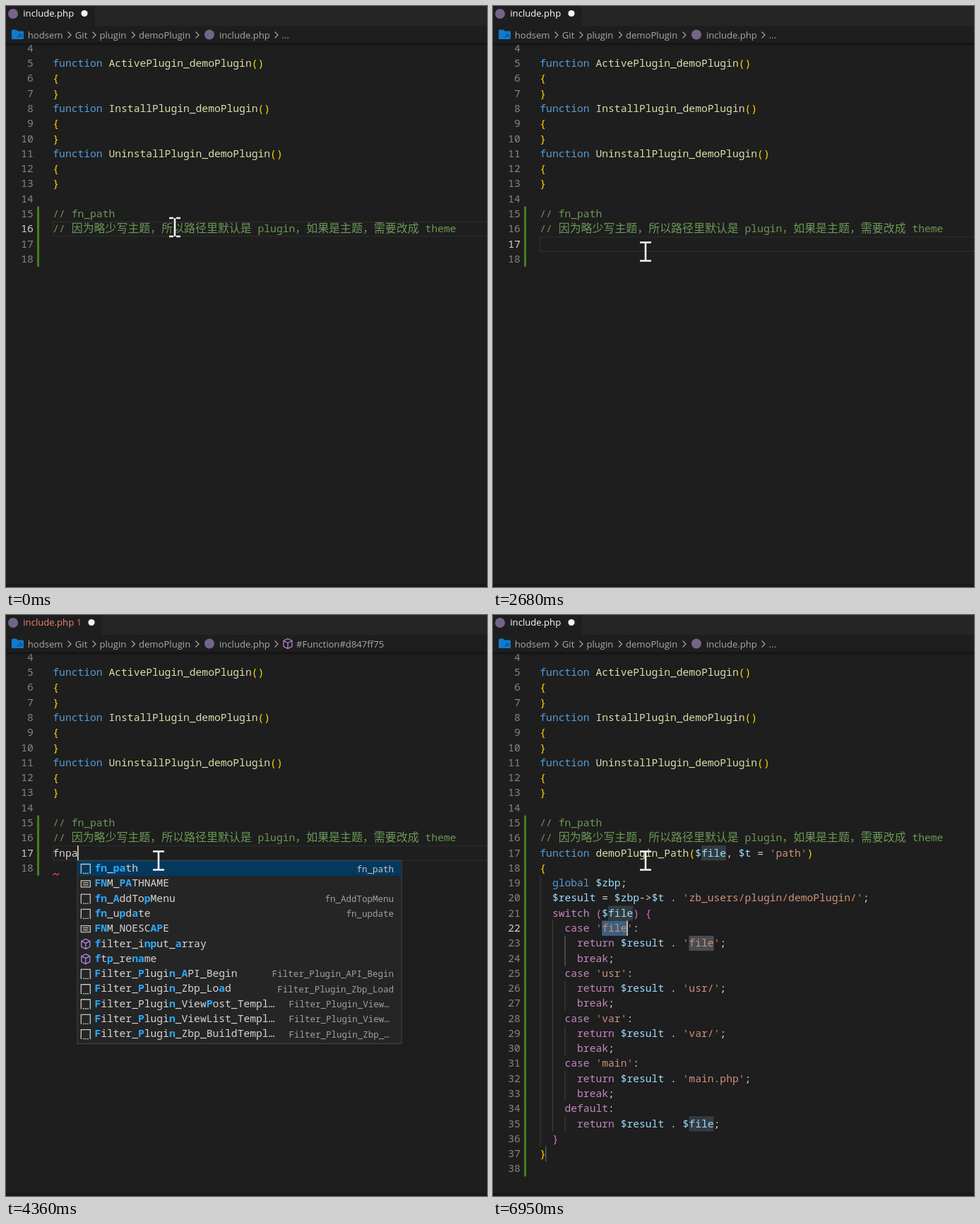
An HTML page that plays this animation: 681 px wide and 822 px high, repeating every 7.17 s.

```html
<!DOCTYPE html>
<html lang="zh-CN">
<head>
<meta charset="utf-8">
<title>Editor snippet demo</title>
<style>
html, body { margin: 0; width: 100%; height: 100%; overflow: hidden; background: #1e1e1e; }
svg { display: block; width: 681px; height: 822px; }
text { white-space: pre; fill: #d4d4d4; font: 14.66px "Noto Sans Mono", "DejaVu Sans Mono", monospace; }
.ui { font: 13.1px "Open Sans", "Noto Sans", sans-serif; fill: #a9a9a9; }
.cjk { font: 300 15.95px "Noto Sans CJK SC", "Noto Sans CJK", sans-serif; }
.num { fill: #858585; text-anchor: end; }
.on { fill: #d0d0d0; }
.detail { font-size: 12.47px; fill: #a0a0a0; }
.hit { fill: #2aaaff; font-weight: 700; }
.line { fill: none; stroke: #c5c5c5; stroke-width: 1.3; }
.cube { stroke: #b180d7; }
</style>
</head>
<body>
<svg id="stage" viewBox="0 0 681 822"></svg>
<script>
const LOOP = 7170, X0 = 66.3, CW = 8.797, LH = 21.28;
const INSERT = 4760;
const stage = document.getElementById('stage');
const parts = [];
const lineY = n => 70.8 + (n - 5) * LH;
const colX = n => X0 + n * CW;

function add(tag, attrs, parent = stage, text) {
  const e = document.createElementNS('http://www.w3.org/2000/svg', tag);
  for (const k in attrs) e.setAttribute(k, attrs[k]);
  if (text !== undefined) e.textContent = text;
  parent.appendChild(e);
  return e;
}
const rect = (x, y, width, height, fill, parent, rx = 0) =>
  add('rect', { x, y, width, height, fill, rx }, parent);
const ui = (x, y, s, fill, parent) =>
  add('text', { x, y, class: 'ui', style: fill ? 'fill:' + fill : '' }, parent, s);

// A group visible only inside the given [from, to) spans
function layer(...spans) {
  const g = add('g', {});
  parts.push([g, spans]);
  return g;
}

const ICONS = {
  cube: 'M0-7 6-4V4L0 7-6 4V-4ZM-6-4 0-1 6-4M0-1V7',
  square: 'M-6.5 7V-6.5H6.5V7M-4 6.5h2M-1 6.5h2M2 6.5h2',
  constant: 'M-6.5-4.5h13v9h-13ZM-4-1.5h8M-4 1.5h8',
  word: 'M-7-5.5h6M2-5.5h5M-7-2h3M-2-2h5M-7 1.5h8M3 1.5h4M-7 5h4M-1 5h7'
};
const icon = (kind, x, y, parent) => add('path', {
  d: ICONS[kind], class: 'line ' + kind, transform: `translate(${x} ${y})`
}, parent);

// ---- code text ----
const BLUE = ['function', 'global'];
const PINK = ['switch', 'case', 'return', 'break', 'default'];
let depth = 0;

function colour(tok) {
  if (tok.startsWith('//')) return '#6a9955';
  if (tok[0] === "'") return '#ce9178';
  if (tok[0] === '$') return '#9cdcfe';
  if (BLUE.includes(tok)) return '#569cd6';
  if (PINK.includes(tok)) return '#c586c0';
  if (/[({]/.test(tok)) return depth++ ? '#da70d6' : '#ffd700';
  if (/[)}]/.test(tok)) return --depth ? '#da70d6' : '#ffd700';
  return /\w/.test(tok) ? '#dcdcaa' : '#d4d4d4';
}

function codeLine(n, src, parent) {
  const t = add('text', { x: X0, y: lineY(n) + 15.4 }, parent);
  for (const tok of src.match(/\/\/.*|'[^']*'|\$\w+|[(){}]|\w+|\s+|./g) || []) {
    const style = 'fill:' + colour(tok);
    for (const run of tok.match(/[\x00-\x7f]+|[^\x00-\x7f]+/g))
      add('tspan', { style, class: run.charCodeAt(0) > 127 ? 'cjk' : '' }, t, run);
  }
}
const codeBlock = (first, src, parent) =>
  src.split('\n').forEach((s, i) => codeLine(first + i, s, parent));

const hooks = ['Active', 'Install', 'Uninstall']
  .map(s => `function ${s}Plugin_demoPlugin()\n{\n}`).join('\n');
const comments = '// fn_path\n// 因为略少写主题，所以路径里默认是 plugin，如果是主题，需要改成 theme';
const branch = (name, out) =>
  `    case '${name}':\n      return $result . '${out}';\n      break;\n`;
const snippet = "function demoPlugin_Path($file, $t = 'path')\n{\n  global $zbp;\n" +
  "  $result = $zbp->$t . 'zb_users/plugin/demoPlugin/';\n  switch ($file) {\n" +
  branch('file', 'file') + branch('usr', 'usr/') + branch('var', 'var/') + branch('main', 'main.php') +
  '    default:\n      return $result . $file;\n  }\n}';

// ---- backgrounds: current line, selections, guides ----
function currentLine(n, ...spans) {
  add('path', { d: `M690 ${lineY(n) + .6}H66.8v${LH - 1}H690`, fill: 'none', stroke: '#2f2f2f', 'stroke-width': 1.2 },
    layer(...spans));
}
currentLine(16, [0, 730]);
currentLine(17, [2150, INSERT]);

rect(220.5, lineY(16), 127.6, LH, '#264f78', layer([730, 860]), 3);
const picked = layer([860, 2150]);
rect(X0, lineY(16), 580, LH, '#264f78', picked, 3);
[88.6, 352.6, 589.2].forEach(cx =>
  add('circle', { cx, cy: lineY(16) + 11, r: 1, fill: '#8099ad' }, picked));

const inserted = layer([INSERT, LOOP]);
const vline = (x, a, b, fill) => rect(x, lineY(a), 1, (b - a + 1) * LH, fill, inserted);
vline(66.5, 19, 36, '#404040');
vline(84, 22, 35, '#404040');
[23, 26, 29, 32].forEach(n => vline(101.5, n, n + 1, n === 23 ? '#707070' : '#404040'));
vline(101.5, 35, 35, '#404040');
vline(74.3, 37, 37, '#7a7a7a');
const mark = (n, c, fill, g) => rect(colX(c), lineY(n), 4 * CW, LH, fill, g);
mark(22, 10, '#3d5f80', inserted);
const matches = layer([5020, LOOP]);
[[17, 26], [21, 11], [35, 24]].forEach(([n, c]) => mark(n, c, '#343b41', matches));
mark(23, 24, '#494c50', matches);

codeBlock(5, hooks);
codeBlock(15, comments);
codeBlock(17, snippet, layer([INSERT, LOOP]));

// ---- gutter ----
const ACTIVE = { 16: [0, 860], 17: [860, INSERT], 22: [INSERT, LOOP] };
for (let n = 4; n <= 38; n++) {
  const put = (cls, g) => add('text', { x: 38.9, y: lineY(n) + 15.4, class: cls }, g, n);
  const a = ACTIVE[n], from = n > 18 ? INSERT : 0;
  if (!a) put('num', layer([from, LOOP]));
  else {
    put('num on', layer(a));
    put('num', layer([from, a[0]], [a[1], LOOP]));
  }
}
rect(44, lineY(15), 3, 4 * LH, '#487e1a', layer([0, INSERT]));
rect(44, lineY(15), 3, 24 * LH, '#487e1a', inserted);

// ---- typed letters ----
[['f', 3400, 3610], ['fn', 3610, 4280], ['fnp', 4280, 4360], ['fnpa', 4360, INSERT]].forEach(([s, a, b]) =>
  add('text', { x: X0, y: lineY(17) + 15.4 }, layer([a, b]), s));

function squiggle(n, width, stroke, ...spans) {
  let d = `M${X0} ${lineY(n) + LH - .8}`;
  for (let x = 3, up = true; x <= width; x += 3, up = !up) d += `l3 ${up ? -2.4 : 2.4}`;
  add('path', { d, fill: 'none', stroke, 'stroke-width': 1.2 }, layer(...spans));
}
squiggle(18, 9, '#f14c4c', [4080, INSERT]);
squiggle(17, 35, '#f14c4c', [4560, INSERT]);
squiggle(17, 35, '#3794ff', [5020, 5160]);
squiggle(38, 9, '#f14c4c', [INSERT, 5160]);

const bulb = layer([5020, 5430]);
rect(70, 305.5, 12, 15, '#1e1e1e', bulb);
add('circle', { cx: 75.6, cy: 311.3, r: 5.4, fill: '#ffcc00' }, bulb);
rect(73, 315, 5.2, 5.4, '#ffcc00', bulb, 1);

// ---- carets ----
function caret(n, x, ...spans) {
  rect(x, lineY(n), 1.7, LH, '#d0d0ce', layer(...spans));
}
caret(16, 373.8, [200, 600]);
caret(16, 236.4, [600, 730]);
caret(17, X0, [1060, 1590], [2150, 2680], [3210, 3400]);
caret(17, colX(1), [3400, 3610]);
caret(17, colX(2), [3610, 4080]);
caret(17, colX(3), [4280, 4360]);
caret(17, colX(4) - .5, [4360, INSERT]);
caret(22, colX(14) - .3, [INSERT, 5500], [6030, 6490], [6950, LOOP]);

// ---- top bars ----
rect(0, 28, 681, 25, '#1e1e1e');
rect(0, 0, 681, 28, '#252526');
const DIRTY = [4220, 5700];
const clean = layer([0, DIRTY[0]], [DIRTY[1], LOOP]), dirty = layer(DIRTY);
[[clean, 126, 111, '#ffffff'], [dirty, 136, 121, '#f88070']].forEach(([g, w, dot, fill]) => {
  rect(0, 0, w, 28, '#1e1e1e', g);
  ui(24.3, 15.4, 'include.php', fill, g);
  add('circle', { cx: dot, cy: 10.5, r: 4.6, fill: '#f4f4f4' }, g);
});
ui(99.8, 15.2, '1', '#d0705f', dirty);
add('circle', { cx: 10, cy: 11, r: 7, fill: '#74648a' });
add('circle', { cx: 288, cy: 40.5, r: 7, fill: '#74648a' });

add('path', { d: 'M8 35q0-1.5 1.5-1.5h5l2 2h7q1.5 0 1.5 1.5v8.5q0 1.5-1.5 1.5h-14q-1.5 0-1.5-1.5z', fill: '#0f7bd0' });
add('path', { d: 'M15.5 44h1M18 44l2.5-5M21.5 44l1.5-3', fill: 'none', stroke: '#0b3f6c', 'stroke-width': 1.3 });
[[30.8, 'hodsem'], [97.8, 'Git'], [132.5, 'plugin'], [188, 'demoPlugin'], [302, 'include.php']].forEach(([x, s]) =>
  ui(x, 45.6, s));
[87.5, 122.5, 178, 268.5, 380.5].forEach(x =>
  add('path', { d: `M${x} 36.5l4.5 4.5-4.5 4.5`, class: 'line', style: 'stroke:#a0a0a0' }));
const SYMBOL = [3940, 5020];
ui(390.5, 45.6, '...', '', layer([0, SYMBOL[0]], [SYMBOL[1], LOOP]));
const symbol = layer(SYMBOL);
icon('cube', 399, 40.5, symbol);
ui(411, 45.6, '#Function#d847ff75', '', symbol);

[.42, .3, .2, .12, .05].forEach((a, i) => rect(0, 52.5 + i, 681, 1, `rgba(0,0,0,${a})`));
rect(0, 818, 681, 4, '#181819');

// ---- completion list; [ ] wraps matched letters ----
const shortList = [
  ['word', '[fn]'], ['cube', '[fn]match'],
  ...['a', 'AddTopMenu', 'Cmd_Ajax', 'GenTpl', 'path', 'update', 'ViewPost', 'zbp']
    .map(s => ['square', '[fn]_' + s, 'fn_' + s]),
  ['cube', '[fn]match'], ['constant', '[FN]M_PERIOD']
];
const longList = [
  ['square', '[fn]_[pa]th', 'fn_path'],
  ['constant', '[FN]M_[PA]THNAME'],
  ['square', '[fn]_[A]ddTo[p]Menu', 'fn_AddTopMenu'],
  ['square', '[fn]_u[p]d[a]te', 'fn_update'],
  ['constant', '[FN]M_NOESC[AP]E'],
  ['cube', '[f]ilter_i[np]ut_[a]rray'],
  ['cube', '[f]t[p]_re[na]me'],
  ['square', '[F]ilter_[P]lugi[n]_[A]PI_Begin', 'Filter_Plugin_API_Begin'],
  ['square', '[F]ilter_[P]lugi[n]_Zbp_Lo[a]d', 'Filter_Plugin_Zbp_Load'],
  ['square', '[F]ilter_Plugi[n]_View[P]ost_Templ…', 'Filter_Plugin_View…'],
  ['square', '[F]ilter_[P]lugi[n]_ViewList_Templ…', 'Filter_Plugin_View…'],
  ['square', '[F]ilter_[P]lugi[n]_Zbp_BuildTempl…', 'Filter_Plugin_Zbp_…']
];

function popup(typed, rows, from, to) {
  const g = layer([from, to]), x = colX(typed) - .4, y = 347.5;
  add('rect', { x, y, width: 459, height: 259, fill: '#252526', stroke: '#454545' }, g);
  rect(x + .5, y + .5, 458, 21, '#04395e', g);
  if (rows === shortList) rect(x + 447.5, y + .5, 11, 42, '#4d4f52', g);
  rows.forEach(([kind, label, detail], i) => {
    const cy = 358.5 + i * LH;
    icon(kind, x + 11.7, cy + .5, g);
    const t = add('text', { x: x + 24.3, y: cy + 4.6 }, g);
    const text = typed === 1 ? label.replace(/\[(.)(.)\]/, '[$1]$2') : label;
    text.split(/[\[\]]/).forEach((s, k) => s && add('tspan', { class: k % 2 ? 'hit' : '' }, t, s));
    if (!detail) return;
    const cut = detail.endsWith('…');
    add('text', {
      x: x + (cut ? 299.5 : 447.8), y: cy + 5, class: 'detail',
      'text-anchor': cut ? 'start' : 'end', style: i ? '' : 'fill:#c5c5c5'
    }, g, detail);
  });
}
popup(1, shortList, 3470, 3610);
popup(2, shortList, 3610, 4280);
popup(3, longList, 4280, 4360);
popup(4, longList, 4360, INSERT);

// ---- mouse pointer ----
const PATH = [[0, 239, 313], [1860, 236, 318], [1930, 230, 331], [2000, 222, 344], [2070, 217, 351], [2320, 216, 347.5]];
const mouse = add('g', { fill: 'none', stroke: '#f2f2f2' });
add('path', { d: 'M0-13V13', 'stroke-width': 2.6 }, mouse);
const serifs = add('path', { 'stroke-width': 2.6 }, mouse);
const SPLIT = 'M-8-13h6M2-13h6M-8 13h6M2 13h6', JOINED = 'M-8-13H8M-8 13H8';

function draw(t) {
  for (const [e, spans] of parts)
    e.style.display = spans.some(([a, b]) => t >= a && t < b) ? '' : 'none';
  const [, x, y] = PATH.filter(p => p[0] <= t).pop();
  mouse.setAttribute('transform', `translate(${x} ${y})`);
  serifs.setAttribute('d', t < 1860 ? SPLIT : JOINED);
}

const start = performance.now();
function tick(now) {
  draw(Math.max(0, now - start) % LOOP);
  requestAnimationFrame(tick);
}
draw(0);
requestAnimationFrame(tick);
</script>
</body>
</html>
```
